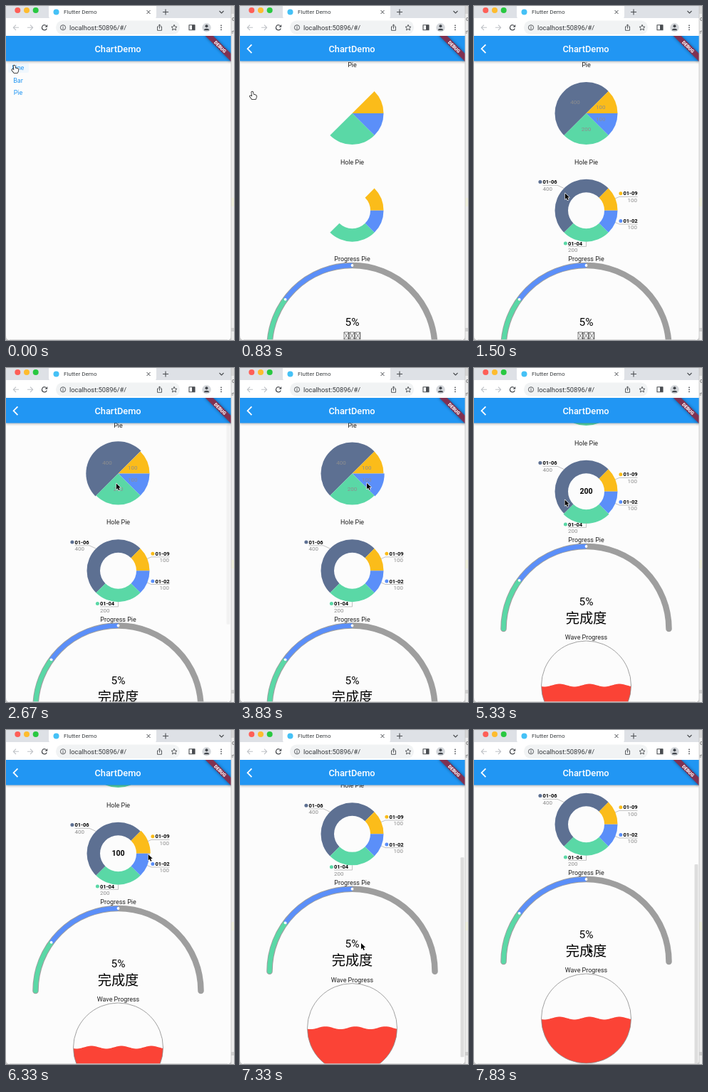
These frames come from a looping animation (320 by 470 pixels, 8000 ms). An HTML page with a canvas:

```html
<!DOCTYPE html>
<html lang="en">
<head>
<meta charset="utf-8">
<title>ChartDemo</title>
<style>
html, body { margin: 0; overflow: hidden; }
canvas { display: block; width: 320px; height: 470px; }
</style>
</head>
<body>
<canvas id="stage"></canvas>
<script>
const canvas = document.getElementById('stage');
const c = canvas.getContext('2d');
const ratio = Math.max(1, window.devicePixelRatio || 1);
canvas.width = 320 * ratio;
canvas.height = 470 * ratio;

const LOOP = 8000, TICK = 1000 / 6, RAD = Math.PI / 180;
const BLUE = '#2196f3', PAPER = '#fcfcfc', INK = '#212121', GREY = '#9e9e9e', DARK = '#4a4d51';
const SLICES = [
  { value: 400, from: 135, to: 315, color: '#5d7092' },
  { value: 100, from: -45, to: 0, color: '#fbbc1a' },
  { value: 100, from: 0, to: 45, color: '#5b8ff9' },
  { value: 200, from: 45, to: 135, color: '#5ad8a6' }
];

// Keys: [time, values...]
const POINTER = [
  [0, 11.5, 84], [333, 16, 120], [1167, 18, 122], [1500, 127.8, 263.5], [2000, 127.8, 263.5],
  [2333, 128, 180], [2500, 138, 150], [2667, 154.8, 162.5], [3500, 156, 165], [3833, 178, 162],
  [4167, 188, 140], [4333, 179.8, 286], [4667, 165, 230], [5000, 152, 206], [5167, 152, 206],
  [5333, 127.5, 185.5], [5667, 133, 150], [6000, 180, 143], [6333, 199.6, 175], [6500, 199.6, 175],
  [7333, 170, 300], [7833, 161, 306]
];
const SCROLL = [[2500, 0], [2667, 2.5], [4167, 2.5], [4333, 27.8], [4500, 114], [7000, 114], [7500, 155]];
const BAR = [[2500, 0], [2667, .04], [3000, 0], [4333, 0], [4500, .1], [5167, 0], [7000, 0], [7333, .12]];
const SLIDE = [[333, 1], [500, .6], [667, .12], [833, 0]];
const SWEEP = [[500, 0], [1167, 1]];
// [start, chart, slice index]
const HOVER = [
  [0, '', -1], [2500, 'pie', 0], [3167, 'pie', 3], [3667, 'pie', 2], [4000, 'pie', 1], [4500, '', -1],
  [4833, 'hole', 3], [5500, 'hole', 0], [6000, 'hole', 1], [6667, '', -1]
];

function lerpKeys(keys, t) {
  const next = keys.findIndex(k => k[0] > t);
  if (next === 0) return keys[0].slice(1);
  if (next < 0) return keys[keys.length - 1].slice(1);
  const a = keys[next - 1], b = keys[next], p = (t - a[0]) / (b[0] - a[0]);
  return a.slice(1).map((v, i) => v + (b[i + 1] - v) * p);
}

function text(str, x, y, size, color = INK, weight = 400, align = 'center') {
  c.font = `${weight} ${size}px Roboto, "Noto Sans CJK SC", "Noto Sans CJK JP", sans-serif`;
  c.textAlign = align;
  c.fillStyle = color;
  c.fillText(str, x, y + size * .355);
}
function box(x, y, w, h, color, radius = 0) {
  c.fillStyle = color;
  c.beginPath();
  c.roundRect(x, y, w, h, radius);
  c.fill();
}
function dot(x, y, r, color) {
  c.fillStyle = color;
  c.beginPath();
  c.arc(x, y, r, 0, 7);
  c.fill();
}
function line(points, color, width = 1) {
  c.strokeStyle = color;
  c.lineWidth = width;
  c.beginPath();
  points.forEach(([x, y]) => c.lineTo(x, y));
  c.stroke();
}
function arc(x, y, r, from, to, color, width, cap = 'butt') {
  c.strokeStyle = color;
  c.lineWidth = width;
  c.lineCap = cap;
  c.beginPath();
  c.arc(x, y, r, from * RAD, to * RAD);
  c.stroke();
  c.lineCap = 'butt';
}
function shape(path, x, y, fill, stroke, width = 1, scale = 1) {
  const p = new Path2D(path);
  c.save();
  c.translate(x, y);
  c.scale(scale, scale);
  if (stroke) { c.strokeStyle = stroke; c.lineWidth = width; c.lineJoin = 'round'; c.stroke(p); }
  if (fill) { c.fillStyle = fill; c.fill(p); }
  c.restore();
}

function ring(y, inner, active, sweep) {
  if (sweep <= 0) return;
  const limit = -45 + 360 * sweep;
  SLICES.forEach((s, i) => {
    const to = Math.min(s.to, limit), r = i === active ? 45.2 : 44;
    if (to <= s.from) return;
    c.fillStyle = s.color;
    c.beginPath();
    c.arc(157.5, y, r, s.from * RAD, to * RAD);
    c.arc(157.5, y, inner, to * RAD, s.from * RAD, true);
    c.fill();
  });
}

function pieChart(active, sweep) {
  ring(151, 0, active, sweep);
  if (sweep < 1) return;
  for (const s of SLICES) {
    const a = (s.from + s.to) / 2 * RAD;
    text(s.value, 157.5 + 22 * Math.cos(a), 151 + 22 * Math.sin(a), 8, '#8e8e8e');
  }
}

function callout(i, name, x, y, right, leader) {
  const s = SLICES[i];
  line(leader, '#aaa', .7);
  dot(x - 3.6, y, 2.5, s.color);
  text(name, x, y, 7.5, '#000', 700, 'left');
  text(s.value, right ? x + 19.5 : x, y + 9.2, 8, '#8c8c8c', 400, right ? 'right' : 'left');
}

function holeChart(active, sweep) {
  ring(287.7, 25.5, active, sweep);
  if (sweep < 1) return;
  callout(0, '01-06', 96.5, 247.5, false, [[96.5, 252.3], [117, 252.3], [126.4, 256.6]]);
  callout(1, '01-09', 209.5, 263.7, true, [[229.5, 268.4], [204, 268.4], [198.2, 270.9]]);
  callout(2, '01-02', 209.5, 302.4, true, [[229.5, 307], [204, 307], [198.2, 304.5]]);
  callout(3, '01-04', 132, 334, false, [[132, 338.4], [157.5, 338.4], [157.5, 331.7]]);
  if (active >= 0) text(SLICES[active].value, 157.5, 287.7, 10.6, '#000', 700);
}

function progressChart(fontReady) {
  const x = 157.5, y = 481, r = 116;
  arc(x, y, r, 180, 360, GREY, 8.5, 'round');
  arc(x, y, r, 180, 216, SLICES[3].color, 6.5, 'round');
  arc(x, y, r, 216, 270, SLICES[2].color, 6.5);
  for (const a of [216, 270]) dot(x + r * Math.cos(a * RAD), y + r * Math.sin(a * RAD), 1.9, '#fff');
  text('5%', x, fontReady ? 442.2 : 445, 15.4, '#000');
  if (fontReady) return text('完成度', x, 466, 19.2, '#000');
  for (let i = 0; i < 3; i++) {
    const l = 146 + i * 8, w = 6.6;
    line([[l, 459], [l + w, 459], [l + w, 469], [l, 469], [l, 459], [l + w, 469], [l + w, 459], [l, 469]], '#333', .6);
  }
}

function waveChart() {
  const x = 157.5, y = 561, r = 63;
  c.save();
  c.beginPath();
  c.arc(x, y, r, 0, 7);
  c.clip();
  c.fillStyle = '#fb4336';
  c.beginPath();
  for (let px = x - r; px <= x + r; px++) c.lineTo(px, y - .5 - 2 * Math.cos((px - 120) / 42 * 2 * Math.PI));
  c.lineTo(x + r, y + r);
  c.lineTo(x - r, y + r);
  c.fill();
  c.restore();
  arc(x, y, r, 0, 360, '#8a8a8a', .8);
}

function chartPage(t, slide) {
  const [scroll] = lerpKeys(SCROLL, t), [bar] = lerpKeys(BAR, t), [sweep] = lerpKeys(SWEEP, t);
  const [, chart, slice] = HOVER.filter(h => h[0] <= t).pop();
  c.save();
  c.translate(316 * slide, 0);
  box(0, 77, 316, 393, PAPER);
  c.save();
  c.translate(0, -scroll);
  text('Pie', 157.5, 83, 9);
  pieChart(chart === 'pie' ? slice : -1, sweep);
  text('Hole Pie', 157.5, 219.4, 8.95);
  holeChart(chart === 'hole' ? slice : -1, sweep);
  text('Progress Pie', 157.5, 356.2, 8.95);
  progressChart(t >= 2000);
  text('Wave Progress', 157.5, 493, 8.95);
  waveChart();
  c.restore();
  if (bar > 0) box(309.5, 78 + scroll * 392 / 547, 5, 281, `rgba(0,0,0,${bar})`, 1);
  c.restore();
}

function listPage(t, slide) {
  const left = 17 - 105 * (1 - slide);
  if (t < 160) box(left - 14, 80, 29, 14, '#f0f7fd', 2);
  ['Line', 'Bar', 'Pie'].forEach((name, i) => text(name, left, 87 + i * 17.6, 9, BLUE));
}

function appBar(slide) {
  c.save();
  c.shadowColor = 'rgba(0,0,0,.25)';
  c.shadowBlur = 3 * ratio;
  c.shadowOffsetY = ratio;
  box(0, 42, 316, 35.6, BLUE);
  c.restore();
  text('ChartDemo', 157, 60.5, 12.8, '#fff', 500);
  c.globalAlpha = 1 - slide;
  line([[16.4, 54.3], [10.6, 60.2], [16.4, 66.1]], '#fff', 1.8);
  c.globalAlpha = 1;
  c.save();
  c.beginPath();
  c.rect(0, 42, 316, 60);
  c.clip();
  c.translate(316, 42);
  c.rotate(45 * RAD);
  c.shadowColor = 'rgba(0,0,0,.5)';
  c.shadowBlur = 4 * ratio;
  box(-26, 17.9, 52, 7.7, 'rgba(140,45,75,.9)');
  c.shadowColor = 'transparent';
  text('DEBUG', 0, 21.8, 6.5, '#fff', 900);
  c.restore();
}

function browser() {
  box(0, 0, 316, 18, '#dee1e6');
  box(60, -6, 151, 26, '#fff', 6);
  box(0, 17, 316, 25, '#fff');
  ['#fe5f57', '#febc2e', '#28c840'].forEach((color, i) => dot(16.3 + i * 12.7, 6, 4, color));
  dot(70.5, 8.5, 4, '#45c1f6');
  text('Flutter Demo', 81, 8.5, 8.1, '#3c4043', 400, 'left');
  shape('M-2.5-2.5 2.5 2.5M2.5-2.5-2.5 2.5', 200, 8.5, null, DARK, 1);
  shape('M-4 0H4M0-4V4', 224, 8.5, null, DARK, 1.1);
  shape('M-3-1.5 0 1.5 3-1.5', 302.5, 8.5, null, DARK, 1.1);
  shape('M4 0H-3.5M0-3.7-3.7 0 0 3.7', 14, 30.3, null, '#bfc2c6', 1.1);
  shape('M-4 0H3.5M0-3.7 3.7 0 0 3.7', 34, 30.3, null, '#bfc2c6', 1.1);
  arc(54, 30.3, 3.5, 20, 310, DARK, 1.2);
  shape('M4.2-4.2V-.6H.6Z', 54, 30.3, DARK);
  box(70, 20.5, 174, 19.5, '#f1f3f4', 9.7);
  arc(80, 30.3, 3.6, 0, 360, DARK, .9);
  shape('M0-.5V2.2M0-2.2V-1.2', 80, 30.3, null, DARK, 1);
  text('localhost:50896/#/', 89, 30.3, 9.35, '#33363a', 400, 'left');
  shape('M-1.2-1.3H-3V4H3V-1.3H1.2M0 1.5V-4.2M-1.8-2.5 0-4.3 1.8-2.5', 215.5, 30.3, null, DARK, .9);
  shape('M0-4 1.2-1.3 4-1 1.9.9 2.5 3.7 0 2.2-2.5 3.7-1.9.9-4-1-1.2-1.3Z', 236, 30.3, null, DARK, .9);
  shape('M-4-3.5H4V3.5H-4Z', 261, 30.3, null, DARK, 1.1);
  box(261, 26.8, 4, 7, DARK);
  dot(281.5, 30.3, 6.2, '#d5d8dc');
  dot(281.5, 28.2, 2, '#42464c');
  shape('M-3.6 3.2C-3.6 0 3.6 0 3.6 3.2Z', 281.5, 31, '#42464c');
  for (let i = -1; i < 2; i++) dot(302, 30.3 + i * 3, .9, DARK);
}

function windowEdge() {
  box(316, 0, 4, 470, '#ececec');
  box(316, 0, 4, 11, '#d6d6d6');
  box(316, 270, 4, 12, '#eeeedc');
  box(316, 453, 4, 5, '#cfcfcf');
  c.save();
  c.beginPath();
  c.rect(316.5, 0, 4, 60);
  c.clip();
  text('G', 317, 18.5, 8, '#555', 400, 'left');
  text('rt', 316.5, 37, 7, '#666', 400, 'left');
  c.restore();
  line([[316, 0], [316, 470]], '#c4c4c4', .8);
  shape('M0 464Q0 470 6 470H0ZM316 464Q316 470 310 470H316Z', 0, 0, '#c9c9c9');
  line([[5, 469.6], [311, 469.6]], '#d0d0d0', .8);
}

function pointer(t) {
  const [x, y] = lerpKeys(POINTER, t);
  if (t < 1000)
    shape('M-1 0Q0-1.2 1 0L1.7 3.4 5 4.2Q6.4 5 5.8 7L4.6 10H-.2L-3.2 6.3Q-3.4 4.7-2 5L-.2 6.2Z', x, y, '#fff', '#111', 1.5);
  else
    shape('M0 0V9L2.1 7.1 3.6 10.5 5.2 9.8 3.7 6.5H6.5Z', x, y, '#000', '#fff', 1.3, .94);
}

function draw(now) {
  const t = Math.floor((now % LOOP + 4) / TICK) % 48 * TICK + .5;
  const [slide] = lerpKeys(SLIDE, t);
  c.setTransform(ratio, 0, 0, ratio, 0, 0);
  box(0, 0, 320, 470, PAPER);
  if (slide > 0) listPage(t, slide);
  if (slide < 1) chartPage(t, slide);
  appBar(slide);
  browser();
  windowEdge();
  pointer(t);
}

const start = performance.now();
function frame() {
  draw(performance.now() - start);
  requestAnimationFrame(frame);
}
frame();
</script>
</body>
</html>
```
